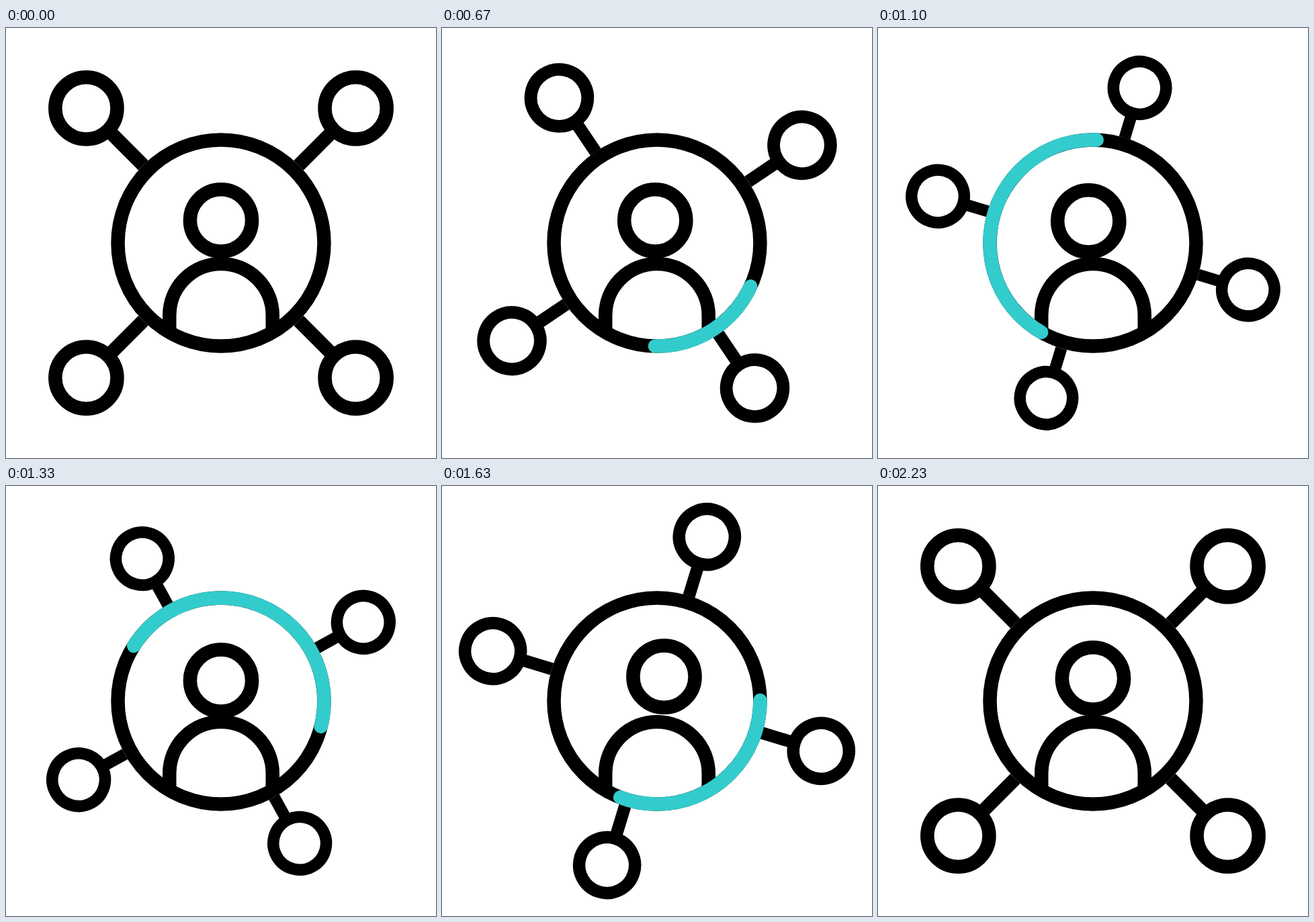
An HTML page that plays this animation: 640x640 px, repeating every 2500 ms.

```html
<!DOCTYPE html>
<html lang="en">
<head>
<meta charset="utf-8">
<title>Network hub</title>
<style>
  html, body { margin: 0; width: 100%; height: 100%; overflow: hidden; background: #fff; }
  svg { display: block; width: 100vw; height: 100vh; }
  .line { fill: none; stroke: #000; stroke-width: 20.5; }
</style>
</head>
<body>
<svg viewBox="0 0 640 640">
  <g id="spokes" class="line"></g>
  <circle cx="320" cy="320" r="163.7" fill="#fff"/>
  <path class="line" d="M243.25 449V427.7a76.75 76.75 0 0 1 153.5 0V449"/>
  <circle class="line" cx="320" cy="320" r="153.5"/>
  <circle id="head" class="line" cx="320" cy="286.3" r="46.1"/>
  <path id="arc" class="line" style="stroke:#33cccc" stroke-linecap="round"/>
</svg>
<script>
const LOOP = 2500, FPS = 30, CENTER = 320, RING = 153.5;
const spokes = document.getElementById('spokes');
const head = document.getElementById('head');
const arc = document.getElementById('arc');

spokes.innerHTML = [45, 135, 225, 315].map(angle =>
  `<g transform="rotate(${angle})"><path d="M155 0H239"/><circle cx="283.7" r="46.1"/></g>`
).join('');

// Symmetric cubic-bezier(.53, 0, .47, 1), solved by bisection.
function ease(u) {
  if (u <= 0) return 0;
  if (u >= 1) return 1;
  const a = 0.53;
  let low = 0, high = 1;
  for (let i = 0; i < 30; i++) {
    const s = (low + high) / 2, r = 1 - s;
    if (3 * a * s * r * r + 3 * (1 - a) * s * s * r + s * s * s < u) low = s;
    else high = s;
  }
  return low * low * (3 - 2 * low);
}

const progress = (frame, from, to) => ease((frame - from) / (to - from));

// Eased stops: every key is [frame, value].
function keyed(keys, frame) {
  let value = keys[0][1];
  for (let i = 1; i < keys.length; i++) {
    value += (keys[i][1] - keys[i - 1][1]) * progress(frame, keys[i - 1][0], keys[i][0]);
  }
  return value;
}

// Smooth flow through the keys, at rest on both ends.
function flow(keys, frame) {
  let i = 0;
  while (i < keys.length - 2 && frame > keys[i + 1][0]) i++;
  const slope = k => k < 1 || k > keys.length - 2 ? 0 :
    (keys[k + 1][1] - keys[k - 1][1]) / (keys[k + 1][0] - keys[k - 1][0]);
  const [x0, y0] = keys[i], [x1, y1] = keys[i + 1];
  const d = x1 - x0, s = (frame - x0) / d, r = 1 - s;
  return y0 * r * r * (1 + 2 * s) + y1 * s * s * (3 - 2 * s)
    + d * s * r * (slope(i) * r - slope(i + 1) * s);
}

const HEAD_X = [[15, 0], [28, -10], [40, 0], [49, 10.5], [58, 0]];
const HEAD_Y = [[28, 0], [40, 3.2], [49, -2.6], [58, 0]];
const ARC_START = [[12, 14], [14, 16.3], [26, 48.7], [40, 212.3], [49, 359.6], [55, 448.5], [60, 491]];
const ARC_END = [[12, 14], [14, 21.4], [26, 168.5], [40, 374.3], [49, 470.9], [55, 488.5], [60, 491]];

function ringPoint(degrees) {
  const a = degrees * Math.PI / 180;
  return `${CENTER + RING * Math.cos(a)} ${CENTER + RING * Math.sin(a)}`;
}

function arcPath(frame) {
  if (frame <= 12 || frame >= 60) return '';
  const start = flow(ARC_START, frame), end = flow(ARC_END, frame);
  if (end <= start) return '';
  return `M${ringPoint(start)}A${RING} ${RING} 0 ${end - start > 180 ? 1 : 0} 1 ${ringPoint(end)}`;
}

function draw(time) {
  const frame = Math.floor((time % LOOP + 4) * FPS / 1000);
  const turn = 180 * progress(frame, 8, 67);
  const scale = 1 - 0.15 * (progress(frame, 8, 31) - progress(frame, 36, 67));
  spokes.setAttribute('transform', `translate(${CENTER} ${CENTER}) rotate(${turn}) scale(${scale})`);
  head.setAttribute('transform', `translate(${keyed(HEAD_X, frame)} ${keyed(HEAD_Y, frame)})`);
  arc.setAttribute('d', arcPath(frame));
}

const origin = performance.now();
function tick() {
  draw(performance.now() - origin);
  requestAnimationFrame(tick);
}
tick();
</script>
</body>
</html>
```
